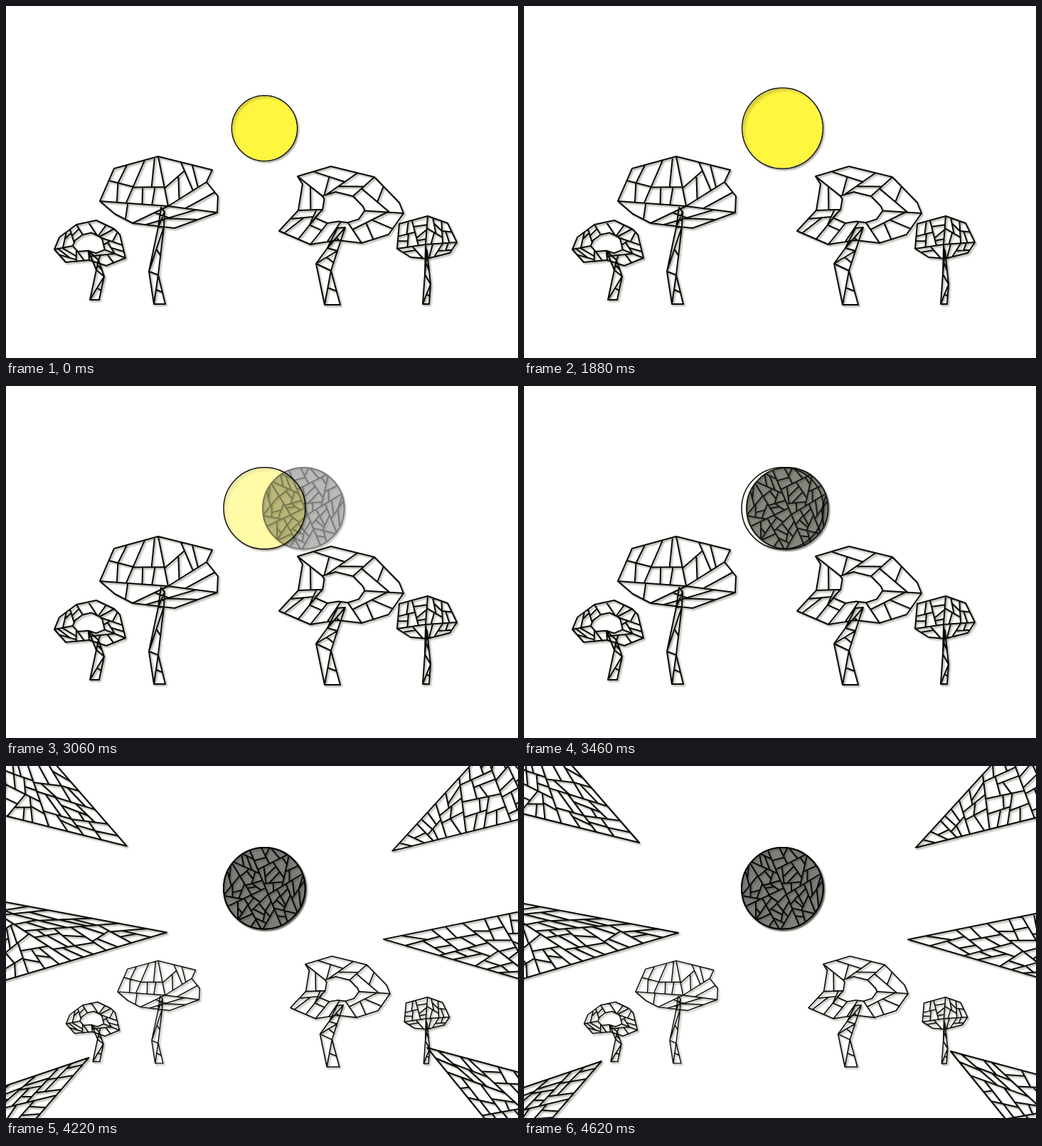
These frames come from a looping animation (720 by 496 pixels, 5020 ms). An HTML page:

```html
<!DOCTYPE html>
<html lang="en">
<head>
<meta charset="utf-8">
<title>Forest eclipse</title>
<style>
html, body { margin: 0; width: 100%; height: 100%; overflow: hidden; background: #fff; }
svg { display: block; width: 720px; height: 496px; }
.lines path { fill: none; stroke: #080806; stroke-width: 2; stroke-linejoin: round; stroke-linecap: round; }
#moon { mix-blend-mode: multiply; }
</style>
</head>
<body>
<svg viewBox="0 0 720 496">
  <defs>
    <filter id="drop" filterUnits="userSpaceOnUse" x="-10" y="-10" width="740" height="516" color-interpolation-filters="sRGB">
      <feDropShadow dx="1.8" dy="2" stdDeviation="1.1" flood-color="#77705f" flood-opacity=".65"/>
    </filter>
    <filter id="carve" filterUnits="userSpaceOnUse" x="-70" y="-70" width="140" height="140" color-interpolation-filters="sRGB">
      <feDropShadow dx="1.6" dy="1.8" stdDeviation="1.2" flood-color="#333330" flood-opacity=".5"/>
    </filter>
    <radialGradient id="glow" cx=".54" cy=".54" r=".54">
      <stop offset=".9" stop-color="#fff63f"/>
      <stop offset="1" stop-color="#d5ca37"/>
    </radialGradient>
  </defs>
  <g filter="url(#drop)">
    <circle id="ring" cx="363.5" cy="172.3" fill="#fff" stroke="#0a0a05" stroke-width="1.5"/>
  </g>
  <circle id="sun" cx="363.5" cy="172.3" fill="url(#glow)"/>
  <g id="moon" class="lines">
    <circle cx="2" cy="2.5" r="58" fill="#77705f" opacity=".35"/>
    <circle r="57.5" fill="#7e7e7b"/>
    <g filter="url(#carve)">
      <g id="cracks"></g>
      <circle r="57.3" fill="none" stroke="#0a0a08" stroke-width="2"/>
    </g>
  </g>
  <g id="trees" class="lines" filter="url(#drop)"></g>
  <g id="rays" class="lines" filter="url(#drop)"></g>
</svg>
<script>
const LOOP = 5020;
const $ = id => document.getElementById(id);
const span = (t, a, b) => Math.min(1, Math.max(0, (t - a) / (b - a)));
const BACK = 1.70158;
const backIn = u => u * u * ((BACK + 1) * u - BACK);
const backOut = u => 1 - backIn(1 - u);

let seed = 7;
function rnd() {
  seed = (seed * 16807) % 2147483647;
  return seed / 2147483647;
}

const mix = (a, b, k) => a.map((v, i) => v + (b[i] - v) * k);
const polar = (deg, r) => [r * Math.cos(deg * Math.PI / 180), r * Math.sin(deg * Math.PI / 180)];
const line = p => "M" + p.map(q => q.map(v => v.toFixed(1))).join("L");
const pts = s => s.split(" ").map(p => p.split(",").map(Number));

function area(p) {
  const cross = p.map((a, i) => {
    const b = p[(i + 1) % p.length];
    return a[0] * b[1] - a[1] * b[0];
  });
  return Math.abs(cross.reduce((s, v) => s + v, 0)) / 2;
}

// Splits a polygon across its longest edge until the shards are near the wanted area
function shatter(poly, cell) {
  if (area(poly) < cell * (.9 + .9 * rnd())) return "";
  const n = poly.length;
  const len = i => Math.hypot(poly[i][0] - poly[(i + 1) % n][0], poly[i][1] - poly[(i + 1) % n][1]);
  const far = poly.reduce((best, _, i) => len(i) > len(best) ? i : best, 0);
  const p = poly.map((_, i) => poly[(far + i) % n]);
  const j = (n >> 1) + (n % 2 && rnd() < .5 ? 1 : 0);
  const a = mix(p[0], p[1], .35 + .3 * rnd());
  const b = mix(p[j], p[(j + 1) % n], .25 + .5 * rnd());
  return line([a, b]) +
    shatter([a, ...p.slice(1, j + 1), b], cell) +
    shatter([b, ...p.slice(j + 1), p[0], a], cell);
}

// Wedges between a crown's rim and its hub, leaving an open core
function crownPath({ crown, hub, core, cell }) {
  const n = crown.length;
  let d = line(crown) + "Z";
  for (let i = 0; i < n; i += 2) {
    const rim = [crown[i], crown[i + 1] || crown[0]];
    if (i + 1 < n) rim.push(crown[(i + 2) % n]);
    const inner = rim.map(p => mix(hub, p, core)).reverse();
    const wedge = core ? [...rim, ...inner] : [...rim, hub];
    d += line(wedge) + "Z" + shatter(wedge, cell);
  }
  return d;
}

// Two sides from the ground up, braced by rungs and diagonals
function trunkPath(left, right) {
  let d = line([...left, ...right.slice().reverse()]) + "Z";
  for (let i = 1; i < left.length; i++) {
    d += line([left[i - 1], right[i], left[i]]);
    d += line([mix(left[i - 1], right[i], .5), mix(right[i - 1], right[i], .4)]);
  }
  return d;
}

function addPath(parent, d) {
  const p = document.createElementNS("http://www.w3.org/2000/svg", "path");
  p.setAttribute("d", d);
  $(parent).append(p);
  return p;
}

// s, x, y: scale and shift of the small pose
const trees = [
  { s: .75, x: 33.5, y: 106, hub: [115, 334], core: .45, cell: 170,
    crown: pts("68,343 75,326 99,308 127,302 152,314 160,322 168,355 141,366 117,358 84,361"),
    left: pts("118,414 127,372 116,345"), right: pts("131,414 138,381 130,358") },
  { s: .695, x: 65.2, y: 127, hub: [228, 282], core: 0, cell: 620,
    crown: pts("132,275 152,229 214,212 290,231 282,248 298,268 297,291 237,313 178,306 153,293"),
    left: pts("208,420 201,374 214,312 218,284"), right: pts("224,420 214,379 222,311 223,290") },
  { s: .8, x: 92.8, y: 87.2, hub: [468, 286], core: .4, cell: 620,
    crown: pts("410,240 457,226 518,241 553,277 559,292 538,322 500,334 466,330 428,336 384,317 411,288 417,251"),
    left: pts("448,421 436,363 452,341 466,313"), right: pts("470,421 457,373 466,345 477,312") },
  { s: .755, x: 145, y: 102.3, hub: [590, 336], core: 0, cell: 150,
    crown: pts("550,342 553,307 593,296 621,306 634,333 624,348 592,356 569,354"),
    left: pts("586,420 589,378 590,340"), right: pts("595,420 597,392 592,345") }
];

// Tip and the angles of both edges
const rays = [
  { tip: [162, 108], from: 229, to: 194 },
  { tip: [217, 235], from: 190.7, to: 163.5 },
  { tip: [109, 416], from: 161.3, to: 130.8 },
  { tip: [551, 115], from: 312.4, to: 346 },
  { tip: [540, 244.5], from: -11.5, to: 16.3 },
  { tip: [600, 402], from: 15, to: 51 }
];

for (const o of trees) o.el = addPath("trees", crownPath(o) + trunkPath(o.left, o.right));
for (const o of rays) {
  const ends = [o.from, o.to].map(deg => polar(deg, 290).map((v, i) => v + o.tip[i]));
  const tri = [o.tip, ...ends];
  o.dir = polar((o.from + o.to) / 2, 225);
  o.el = addPath("rays", line(tri) + "Z" + shatter(tri, 360));
}
const rim = Array.from({ length: 24 }, (_, i) => polar(i * 15, 57));
addPath("cracks", shatter(rim, 190));

function draw(t) {
  const r = 57.5 - 11.5 * Math.exp(-Math.max(0, t - 520) / 500);
  $("ring").setAttribute("r", r);
  $("sun").setAttribute("r", r - .7);

  const fade = span(t, 2520, 3520);
  $("sun").setAttribute("opacity", 1 - fade);
  $("moon").setAttribute("opacity", fade);
  $("moon").setAttribute("transform", `translate(${363.3 + 120 * (1 - fade)} 172.4)`);

  const k = backIn(span(t, 3520, 3760));
  for (const { el, s, x, y } of trees)
    el.setAttribute("transform", `translate(${x * k} ${y * k}) scale(${1 + (s - 1) * k})`);

  const away = 1 - backOut(span(t, 3940, 4620));
  $("rays").style.display = t < 3940 ? "none" : "";
  for (const { el, dir } of rays)
    el.setAttribute("transform", `translate(${dir[0] * away} ${dir[1] * away})`);
}

const start = performance.now();
function tick() {
  draw((performance.now() - start) % LOOP);
  requestAnimationFrame(tick);
}
draw(0);
requestAnimationFrame(tick);
</script>
</body>
</html>
```
